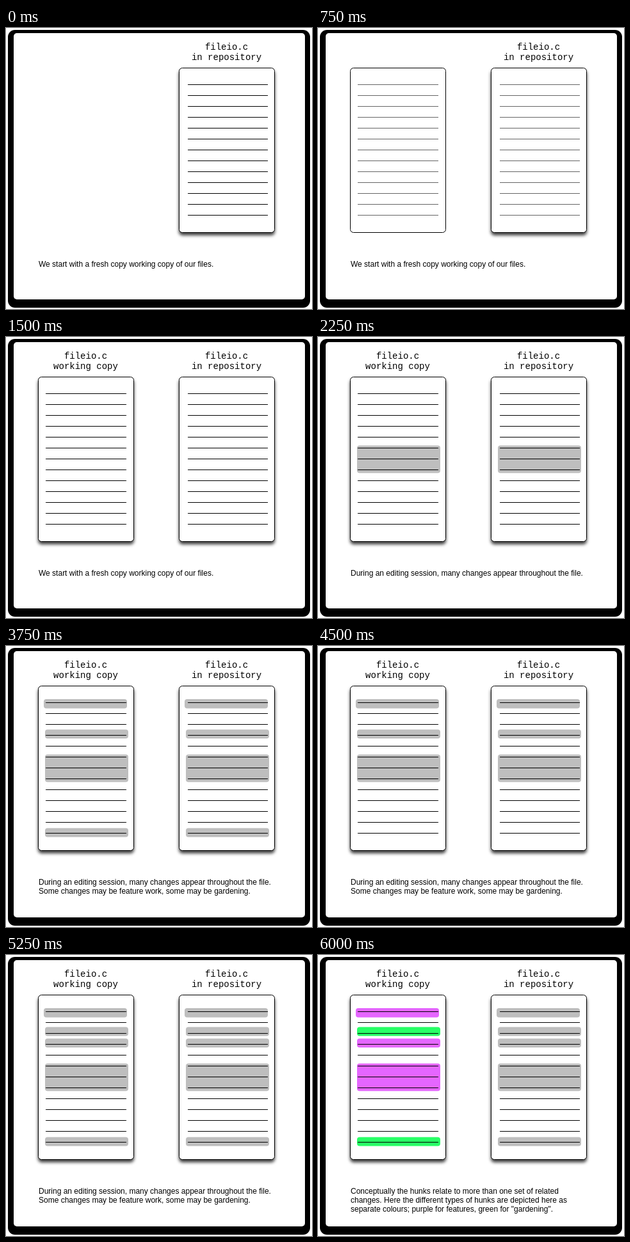
Animation of 478x439 px, one loop 8000 ms. Source, as an HTML page:

```html
<!DOCTYPE html>
<html lang="en">
<head>
<meta charset="utf-8">
<title>Changes in a working copy</title>
<style>
  html, body { margin: 0; width: 100%; height: 100%; overflow: hidden; background: #fff; }
  svg { display: block; width: 478px; height: 439px; }
  .title { font: 14px "Courier New", "Liberation Mono", monospace; text-anchor: middle; }
  .caption { font: 12px Helvetica, "Liberation Sans", Arial, sans-serif; }
  .sheet { fill: #fff; stroke: #000; }
  .shadow { filter: drop-shadow(0 4px 2.5px rgba(0, 0, 0, .75)); }
</style>
</head>
<body>
<svg id="stage" viewBox="0 0 478 439">
  <rect x="3" y="3" width="472" height="434" rx="11"/>
  <rect x="12" y="8" width="455" height="416" rx="5" fill="#fff"/>
</svg>
<script>
const LOOP = 8000, STEP = 750;
const GREY = '#bebebe', PURPLE = '#e566ff', GREEN = '#28ff66';
const stage = document.getElementById('stage');

function add(parent, tag, attrs = {}, text = '') {
  const el = document.createElementNS('http://www.w3.org/2000/svg', tag);
  for (const key in attrs) el.setAttribute(key, attrs[key]);
  el.textContent = text;
  parent.appendChild(el);
  return el;
}

// Each hunk: left inset, top, height, colour by topic, steps at which it is visible.
const hunks = [
  { dx: 9, y: 83, h: 14.5, colour: PURPLE, on: s => s >= 4 },
  { dx: 11, y: 112.5, h: 14, colour: GREEN, on: s => s >= 7 },
  { dx: 11, y: 130.5, h: 14, colour: PURPLE, on: s => s >= 5 },
  { dx: 11, y: 169.5, h: 43, colour: PURPLE, on: s => s >= 3 },
  { dx: 11, y: 284.5, h: 14, colour: GREEN, on: s => s >= 5 && s !== 6 }
];

const editing = 'During an editing session, many changes appear throughout the file.';
const captions = [
  { from: 8, lines: [
    'Conceptually the hunks relate to more than one set of related',
    'changes. Here the different types of hunks are depicted here as',
    'separate colours; purple for features, green for "gardening".'] },
  { from: 4, lines: [editing, 'Some changes may be feature work, some may be gardening.'] },
  { from: 3, lines: [editing] },
  { from: 0, lines: ['We start with a fresh copy working copy of our files.'] }
];

function makeFile(x, lineX, lineEnd, label) {
  const group = add(stage, 'g');
  const title = add(group, 'g', { class: 'title' });
  add(title, 'text', { x: x + 74.5, y: 33.5 }, 'fileio.c');
  add(title, 'text', { x: x + 74.5, y: 49.5 }, label);
  const sheet = add(group, 'rect',
    { class: 'sheet shadow', x: x + .5, y: 62.5, width: 149, height: 257, rx: 5 });
  const marks = hunks.map(k => add(group, 'rect',
    { x: x + k.dx, y: k.y, width: 130, height: k.h, rx: 4 }));
  let path = '';
  for (let i = 0; i < 13; i++) path += `M${lineX} ${88.5 + 17 * i}H${lineEnd}`;
  const lines = add(group, 'path', { d: path, stroke: '#000' });
  return { group, title, sheet, marks, lines };
}

const working = makeFile(50, 62, 188, 'working copy');
const repo = makeFile(270, 284, 409, 'in repository');
const caption = [0, 1, 2].map(i =>
  add(stage, 'text', { class: 'caption', x: 51, y: 373 + 14 * i }));

const show = (el, on) => el.setAttribute('visibility', on ? 'visible' : 'hidden');

function draw(time) {
  const step = Math.min(8, Math.floor(time / STEP));
  const copying = step === 1;

  working.group.style.display = step ? '' : 'none';
  show(working.title, !copying);
  working.sheet.classList.toggle('shadow', !copying);

  for (const file of [working, repo]) {
    file.lines.setAttribute('opacity', copying ? .6 : 1);
    hunks.forEach((k, i) => {
      show(file.marks[i], k.on(step));
      file.marks[i].setAttribute('fill', file === working && step === 8 ? k.colour : GREY);
    });
  }

  const { lines } = captions.find(c => step >= c.from);
  caption.forEach((el, i) => { el.textContent = lines[i] || ''; });
}

const start = performance.now();
function tick() {
  draw((performance.now() - start) % LOOP);
  requestAnimationFrame(tick);
}
tick();
</script>
</body>
</html>
```
